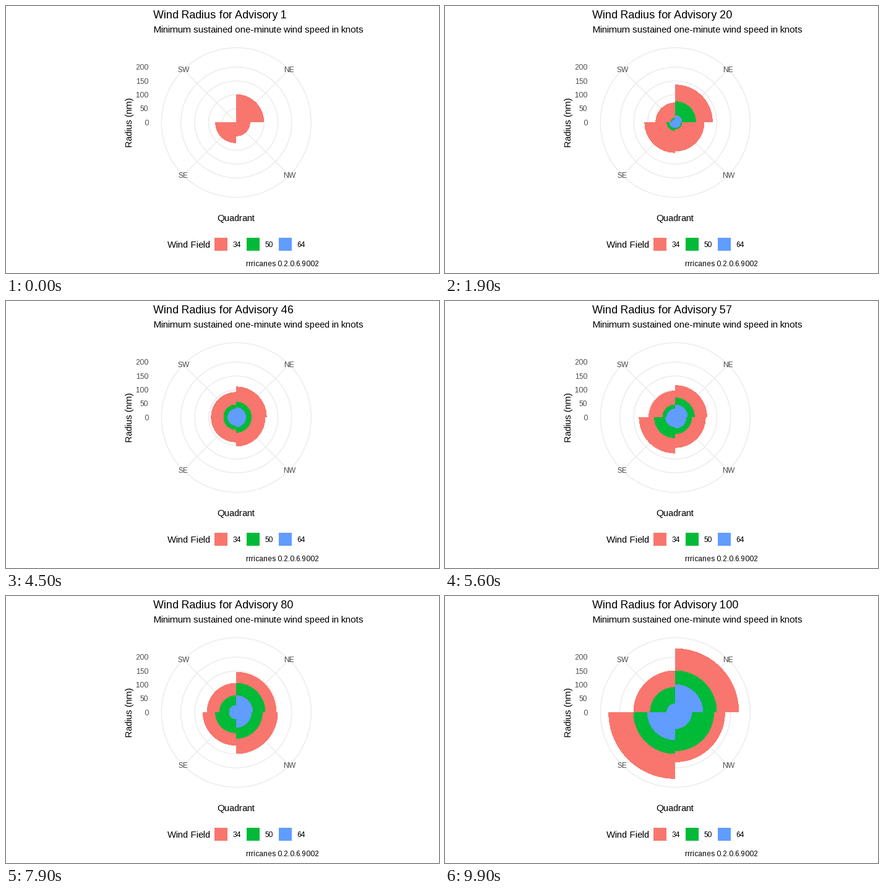
These frames come from a looping animation (700x432 px, 10 s). A matplotlib script:

```python
import numpy as np
import matplotlib.pyplot as plt
from matplotlib.animation import FuncAnimation
from matplotlib.patches import Circle, Rectangle, Wedge

W, H, DPI = 700, 432, 100
FRAMES = 100
CX, CY = 372.3, 188.5
SCALE = 0.448      # pixels per nautical mile
RIM = 121
PX = 72 / DPI      # points per pixel
BASE, SMALL, LARGE = 14.67, 12, 18
COLORS = {34: "#F8766D", 50: "#00BA38", 64: "#619CFF"}
GRID, GREY = "#EBEBEB", "#4D4D4D"

# Key points per quadrant (NE, NW, SE, SW): the 34 kt radius in nm
OUTER = {0: (100, 50, 75, 0), 10: (150, 120, 120, 45),
         28: (120, 90, 100, 90), 45: (110, 105, 90, 90),
         69: (120, 120, 175, 100), 80: (145, 155, 115, 105),
         90: (180, 165, 150, 120), 99: (230, 180, 240, 150)}

# Stronger winds reach a share of that radius: a half and a third once mature
NONE, HALF, THIRD = (0,) * 4, (1 / 2,) * 4, (1 / 3,) * 4
SHARE = {
    34: {0: (1,) * 4},
    50: {0: NONE, 10: (.6, 0, 0, 0), 28: HALF, 45: HALF,
         69: (.75, .62, .69, .5), 90: (.72, .64, .53, .62), 99: (.65, .78, .62, .6)},
    64: {10: NONE, 28: THIRD, 45: THIRD,
         69: (.42, .42, .23, .3), 90: (.42, .33, .17, .17), 99: (.43, .33, .42, .2)},
}

plt.rcParams.update({
    "font.family": "Liberation Sans",
    "text.hinting": "force_autohint",
    "text.hinting_factor": 1,
})

fig = plt.figure(figsize=(W / DPI, H / DPI), dpi=DPI, facecolor="white")
ax = fig.add_axes([0, 0, 1, 1])
ax.set_xlim(0, W)
ax.set_ylim(H, 0)
ax.axis("off")


def label(x, y, text, px=SMALL, color="black", ha="left", **kw):
    return ax.text(x, y, text, fontsize=px * PX, color=color, ha=ha,
                   va="baseline", zorder=5, **kw)


def draw_grid():
    style = dict(lw=1.42 * PX, zorder=1)
    for r in [50 * SCALE * k for k in range(1, 5)] + [RIM]:
        ax.add_patch(Circle((CX, CY), r, fill=False, ec=GRID, **style))
    d = RIM * np.sqrt(0.5)
    for s in (-1, 1):
        ax.plot([CX - d, CX + d], [CY - s * d, CY + s * d], color=GRID, **style)
    for nm in range(0, 201, 50):
        label(230, round(CY - nm * SCALE + 4.3), str(nm), color=GREY, ha="right")
    for name, sx, sy in (("NE", 1, -1), ("NW", 1, 1), ("SE", -1, 1), ("SW", -1, -1)):
        label(CX + sx * d, round(CY + sy * d + 4.2), name, color=GREY, ha="center")


def draw_legend():
    label(261, 391, "Wind Field", BASE)
    for i, (speed, color) in enumerate(COLORS.items()):
        x = 337 + 52 * i
        ax.add_patch(Rectangle((x, 375), 21, 21, fc=color, lw=0))
        label(x + 29.5, 390, str(speed))


def make_wedges():
    # Unsmoothed fills cover every touched pixel, so the corner sits on the pixel grid
    corner = int(CX), int(CY)
    return {(speed, quad): ax.add_patch(
                Wedge(corner, 1, 90 * quad - 90, 90 * quad, fc=color, lw=0,
                      antialiased=False, zorder=2 + speed / 100))
            for speed, color in COLORS.items() for quad in range(4)}


def at(keys, quad, step):
    return np.interp(step, list(keys), [v[quad] for v in keys.values()])


def radius(speed, quad, step):
    nm = at(OUTER, quad, step) * at(SHARE[speed], quad, step)
    return 5 * np.floor(nm / 5 + 0.5)   # advisories report multiples of 5


draw_grid()
draw_legend()
title = label(238, 20, "", LARGE)
label(238, 43, "Minimum sustained one-minute wind speed in knots", BASE)
label(372, 348, "Quadrant", BASE, ha="center")
label(204, CY, "Radius (nm)", BASE, ha="center", rotation=90, rotation_mode="anchor")
label(388, 421, "rrricanes 0.2.0.6.9002")
wedges = make_wedges()


def update(step):
    title.set_text(f"Wind Radius for Advisory {step + 1}")
    for (speed, quad), wedge in wedges.items():
        nm = radius(speed, quad, step)
        wedge.set_visible(bool(nm > 0))
        if nm > 0:
            wedge.set_radius(nm * SCALE - 0.2)
    return [title, *wedges.values()]


anim = FuncAnimation(fig, update, frames=FRAMES, interval=100,
                     repeat=True, repeat_delay=0, blit=False)
plt.show()
```
